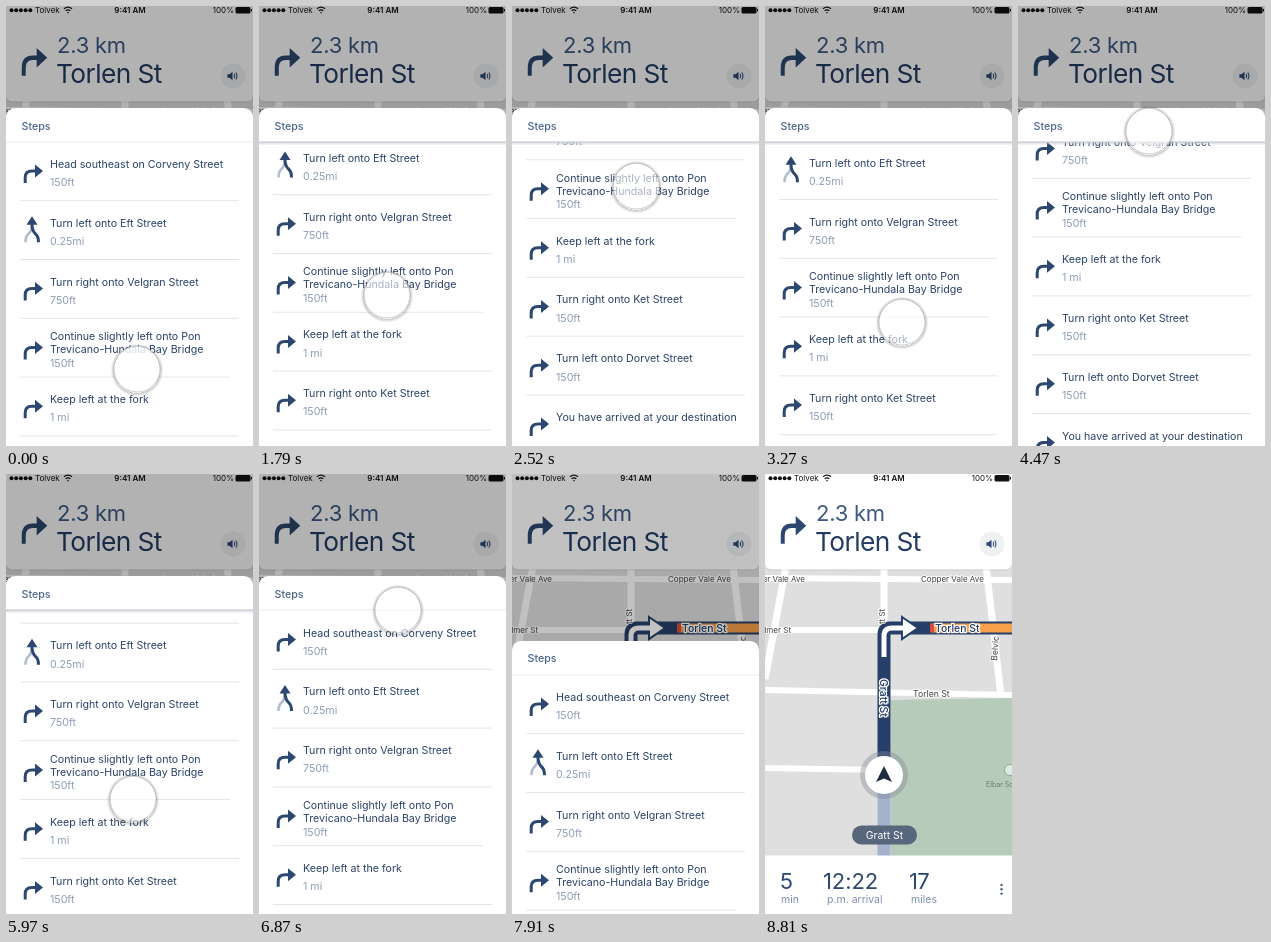
Animation of 247x440 px, one loop 9390 ms. Source, as an HTML page:

```html
<!DOCTYPE html>
<html lang="en">
<meta charset="utf-8">
<title>Route steps</title>
<style>
  html, body { margin: 0; width: 100%; height: 100%; overflow: hidden; background: #fff; }
  svg { display: block; width: 247px; height: 440px; }
  text { font-family: Inter, Roboto, sans-serif; fill: #2c4770; }
  .status { font-size: 8px; fill: #111; }
  .big { font-size: 26.3px; letter-spacing: -.6px; fill: #243c64; }
  .mid { font-size: 22px; letter-spacing: -.6px; }
  .unit { font-size: 10.5px; fill: #7d8fae; }
  .map { font-size: 8px; fill: #444; stroke: #fff; stroke-width: 1.6px; paint-order: stroke; }
  .route { font-size: 10.4px; font-weight: 500; fill: #223c63; stroke: #fff; stroke-width: 2.4px; paint-order: stroke; }
  .step { font-size: 10.65px; fill: #2b4368; }
  .dist { font-size: 10.65px; fill: #8d9db6; }
  .line { fill: none; stroke: #2c4770; stroke-width: 3; }
  .road { fill: none; stroke: #fff; stroke-width: 6; }
</style>
<svg viewBox="0 0 247 440">
  <defs>
    <g id="turn">
      <path class="line" d="M1.7 19.5V14Q1.7 7.5 8.5 7.5H13"/>
      <path d="M11.5 1 19.5 7.5 11.5 14Z" fill="#2c4770"/>
    </g>
    <g id="merge" fill="none" stroke-width="2.6">
      <path d="M9 8Q8.500 14 5.500 16.500Q2.500 19 2.500 25" stroke="#b3bdcd"/>
      <path class="line" d="M9 5V8Q9.500 14 12.500 16.500Q15.500 19 15.500 25"/>
      <path d="M9 -1 14.500 7.500H3.500Z" fill="#2c4770"/>
    </g>
    <linearGradient id="fade" x2="0" y2="1">
      <stop stop-color="#b9bec6" stop-opacity=".75"/>
      <stop offset="1" stop-color="#b9bec6" stop-opacity="0"/>
    </linearGradient>
    <radialGradient id="halo">
      <stop offset=".86" stop-color="#000" stop-opacity="0"/>
      <stop offset=".87" stop-color="#000" stop-opacity=".22"/>
      <stop offset="1" stop-color="#000" stop-opacity="0"/>
    </radialGradient>
    <clipPath id="body"><rect y="136" width="247" height="320"/></clipPath>
  </defs>

  <!-- map -->
  <rect y="90" width="247" height="295" fill="#dfdfdf"/>
  <path d="M126 226 247 224V382H126Z" fill="#b7cbbb"/>
  <g class="road">
    <path d="M0 104 247 106M0 156H119M0 216 247 221M0 294 119 296"/>
    <path d="M21 92 0 205M221 92 236 222M119 92V382" stroke-width="7"/>
  </g>
  <path d="M119 301V382" stroke="#a6b2cb" stroke-width="13"/>
  <path d="M119 301V160Q119 154 125 154H247" fill="none" stroke="#263f68" stroke-width="13"/>
  <path d="M167 154H247" stroke="#f7a04b" stroke-width="9"/>
  <path d="M165 154H169" stroke="#dd4b3e" stroke-width="9"/>
  <path d="M137 143 153 154 137 165Z" fill="#fff" stroke="#263f68" stroke-width="2"/>
  <path d="M119 183V162Q119 154 127 154H142" fill="none" stroke="#fff" stroke-width="5"/>
  <text class="map" x="40" y="108" text-anchor="end">Copper Vale Ave</text>
  <text class="map" x="156" y="108">Copper Vale Ave</text>
  <text class="map" x="26" y="159" text-anchor="end">Dalmer St</text>
  <text class="map" x="148" y="222.5" style="font-size:8.7px">Torlen St</text>
  <text class="map" transform="translate(120 150) rotate(-90)">tt St</text>
  <text class="map" transform="translate(232 187) rotate(-86)" style="font-size:8.7px">Belvic</text>
  <text class="map" x="221" y="313" style="font-size:7px;fill:#5f7f68;stroke:none">Elbar Square</text>
  <circle cx="245" cy="296" r="5.5" fill="#dfe9e1" stroke="#8fa897"/>
  <text class="route" x="170" y="158">Torlen St</text>
  <text class="route" transform="translate(114.5 205) rotate(90)">Gratt St</text>
  <circle cx="119" cy="301" r="24" fill="#7f8794" opacity=".4"/>
  <circle cx="119" cy="301" r="19" fill="#fff"/>
  <path d="M119 292 127 308 119 304.5 111 308Z" fill="#1f2c42"/>
  <rect x="87" y="351.5" width="65" height="19" rx="9.5" fill="#58677c"/>
  <text x="119.5" y="364.8" text-anchor="middle" style="font-size:10.4px;fill:#fff">Gratt St</text>

  <!-- trip summary -->
  <rect y="381.5" width="247" height="59" fill="#fff"/>
  <text class="mid" x="15" y="415">5</text>
  <text class="mid" x="58" y="415" style="letter-spacing:-.1px">12:22</text>
  <text class="mid" x="144" y="415">17</text>
  <text class="unit" x="16" y="429">min</text>
  <text class="unit" x="62" y="429">p.m. arrival</text>
  <text class="unit" x="146" y="429">miles</text>
  <g id="more" fill="#4a5d7c">
    <circle cx="236.5" cy="411" r="1.2"/><circle cx="236.5" cy="415.3" r="1.2"/><circle cx="236.5" cy="419.6" r="1.2"/>
  </g>

  <!-- next turn -->
  <rect y="-10" width="247" height="106.5" rx="6" fill="#000" opacity=".1"/>
  <rect y="-10" width="247" height="105.5" rx="6" fill="#fff"/>
  <g id="dots" fill="#111"></g>
  <text class="status" x="29" y="7">Tolvek</text>
  <g fill="none" stroke="#111" stroke-width="1.3">
    <path d="M58 2.8Q62 -.4 66 2.8M59.7 4.8Q62 3 64.3 4.8"/>
    <path d="M62 6V7.3"/>
  </g>
  <text class="status" x="124" y="7" text-anchor="middle" style="font-weight:600">9:41 AM</text>
  <text class="status" x="228" y="7" text-anchor="end">100%</text>
  <rect x="229.5" y="1" width="15" height="6.5" rx="1.5" fill="#111"/>
  <path d="M245.5 3V5.5" stroke="#111"/>
  <use href="#turn" transform="translate(15.5 40.5) scale(1.32 1.5)"/>
  <text class="mid" x="51" y="47" style="letter-spacing:-.25px;fill:#3d5882">2.3 km</text>
  <text class="big" x="50" y="77">Torlen St</text>
  <circle cx="227" cy="70" r="12.5" fill="#eff1f3"/>
  <g transform="translate(226.5 70) scale(.85) translate(-227 -70)">
    <path d="M221 68H223.5L227 65V75L223.5 72H221Z" fill="#2c4770"/>
    <path d="M228.8 67.5Q230.5 70 228.8 72.5M230.8 65.8Q233.8 70 230.8 74.2" fill="none" stroke="#2c4770" stroke-width="1.2"/>
  </g>

  <rect id="dim" width="247" height="440"/>

  <!-- steps sheet -->
  <g id="sheet">
    <rect y="102" width="247" height="360" rx="9" fill="#fff"/>
    <g clip-path="url(#body)"><g id="list"></g></g>
    <path d="M0 136H247" stroke="#e6eaef"/>
    <rect id="shade" y="135.5" width="247" height="4" fill="url(#fade)"/>
    <text x="15.5" y="123.5" style="font-size:10.7px;font-weight:500;fill:#4b668c">Steps</text>
  </g>
  <g id="touch">
    <circle cy="1" r="26.5" fill="url(#halo)"/>
    <circle id="disc" r="23" fill="#fff" stroke="#a9a9a9" stroke-width=".6"/>
  </g>
</svg>
<script>
const $ = id => document.getElementById(id);
const LOOP = 9390, PITCH = 58.8, DIM = .3;

const steps = [
  ['150ft', 'Head southeast on Corveny Street'],
  ['0.25mi', 'Turn left onto Eft Street'],
  ['750ft', 'Turn right onto Velgran Street'],
  ['150ft', 'Continue slightly left onto Pon', 'Trevicano-Hundala Bay Bridge'],
  ['1 mi', 'Keep left at the fork'],
  ['150ft', 'Turn right onto Ket Street'],
  ['150ft', 'Turn left onto Dorvet Street'],
  ['', 'You have arrived at your destination']
];

$('list').innerHTML = steps.map(([dist, ...lines], i) => {
  const double = lines.length > 1;
  const top = double ? 157.7 : 162;
  const text = lines.map((s, k) => `<text class="step" x="44" y="${top + 13 * k}">${s}</text>`).join('');
  const icon = i === 1 ? '<use href="#merge" x="17" y="152.5"/>' : '<use href="#turn" x="17.5" y="157.5"/>';
  const rule = i < steps.length - 1 ? `<path d="M14 194.7H${double ? 224 : 233}" stroke="#e2e6ea"/>` : '';
  return `<g transform="translate(0 ${i * PITCH})">${icon}${text}
    <text class="dist" x="44" y="${double ? 184.5 : 180.3}">${dist}</text>${rule}</g>`;
}).join('');

$('dots').innerHTML = [0, 1, 2, 3, 4].map(i => `<circle cx="${5.5 + i * 4.7}" cy="4.3" r="2"/>`).join('');

// time, touch x, touch y, list scroll
const keys = [
  [0, 131, 363, 0], [1340, 131, 363, 0], [1790, 128, 289, 64.8], [2380, 124, 182, 158],
  [2700, 126, 190, 150], [3270, 137, 316, 60], [3570, 138, 350, 0], [3720, 137, 340, 2],
  [4470, 131, 125, 140], [5070, 130, 102, 168], [5220, 130, 102, 168], [5970, 127, 325, 45.5],
  [6270, 128, 345, -4], [6870, 139, 136, -.6], [7320, 162, 59, 0], [LOOP, 162, 59, 0]
];

// Tangent at key i, flat at turning points
function slope(i, c) {
  const a = keys[i - 1], b = keys[i], d = keys[i + 1];
  if (!a || !d || (b[c] - a[c]) * (d[c] - b[c]) <= 0) return 0;
  return (d[c] - a[c]) / (d[0] - a[0]);
}

function track(t, c) {
  const i = keys.findIndex(k => k[0] > t) - 1;
  const a = keys[i], b = keys[i + 1], span = b[0] - a[0], u = (t - a[0]) / span, v = 1 - u;
  return a[c] * v * v * (1 + 2 * u) + b[c] * u * u * (1 + 2 * v)
    + span * u * v * (slope(i, c) * v - slope(i + 1, c) * u);
}

// Poses are held for 150 ms, counted from the latest anchor
function hold(t) {
  const from = [7760, 2520, 1930, 1490, 0].find(a => a <= t);
  return from + Math.floor((t - from) / 150) * 150;
}

function draw(now) {
  const t = hold(now % LOOP);
  const u = Math.min(1, Math.max(0, (t - 7620) / 1040));
  const out = u * u * (3 - 2 * u);
  const scroll = track(t, 3);

  $('list').setAttribute('transform', `translate(0 ${-scroll})`);
  $('shade').setAttribute('opacity', Math.min(1, Math.max(0, scroll / 8)));
  $('sheet').setAttribute('transform', `translate(0 ${342 * out})`);
  $('dim').setAttribute('opacity', DIM * (1 - out));
  $('more').setAttribute('opacity', t < 8810 ? 0 : 1);
  $('touch').setAttribute('transform', `translate(${track(t, 1)} ${track(t, 2)})`);
  $('touch').setAttribute('visibility', t < 7470 ? 'visible' : 'hidden');
  $('disc').setAttribute('fill-opacity', t < 1200 ? .82 : .6);
  requestAnimationFrame(() => draw(performance.now() - start));
}

const start = performance.now();
draw(0);
</script>
</html>
```
